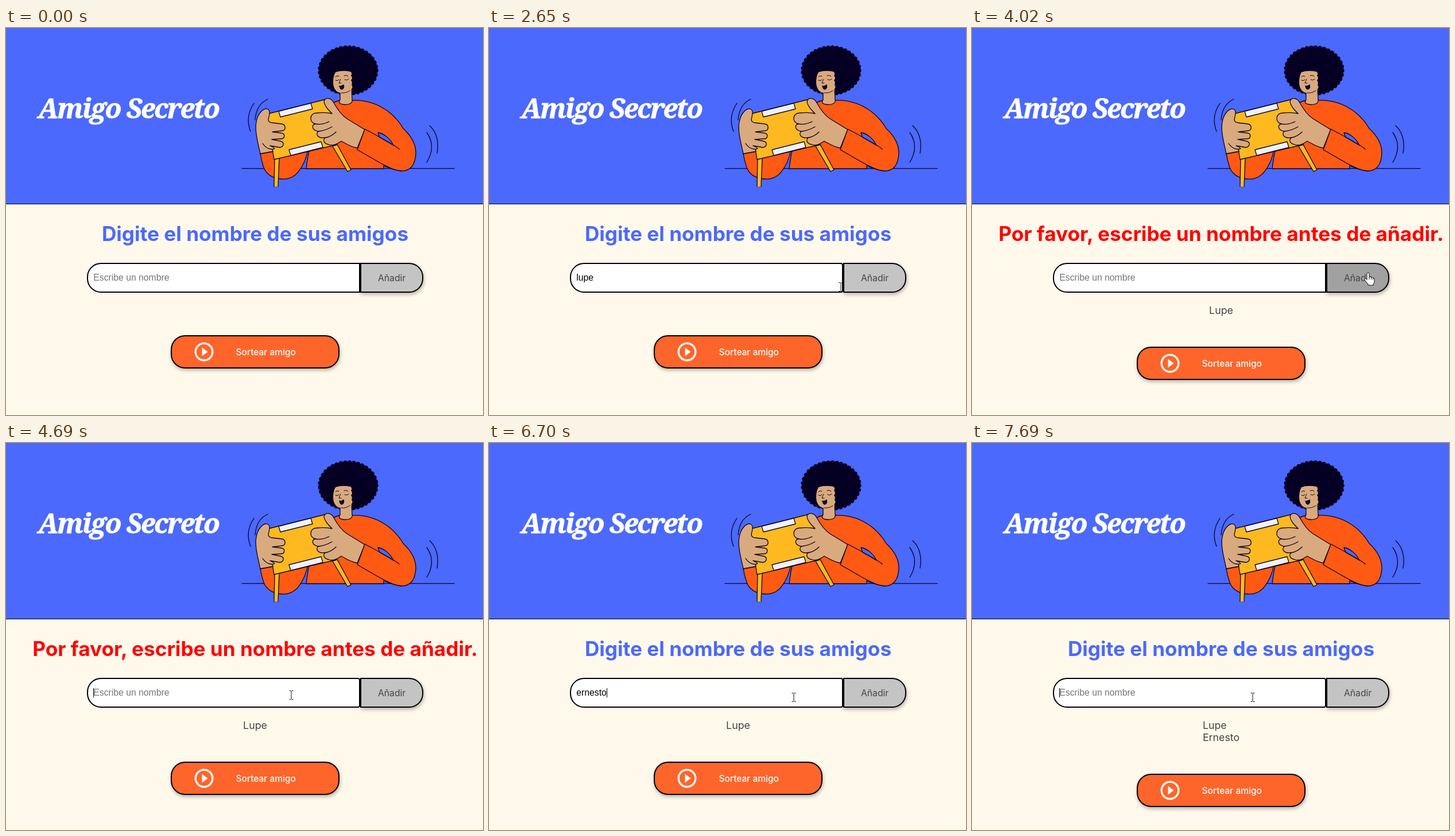
Write an HTML page that moves like this. It is 831x674 px and loops after 8 s.

```html
<!DOCTYPE html>
<html lang="es">
<head>
<meta charset="utf-8">
<title>Amigo Secreto</title>
<style>
  html, body { margin: 0; width: 100%; height: 100%; overflow: hidden; background: #fff9eb; }
  svg { display: block; width: 831px; height: 674px; }
  text { font-family: Inter, sans-serif; font-size: 15.7px; white-space: pre; }
  .title { font: italic 700 47px "Noto Serif", serif; letter-spacing: -2.1px; fill: #fff; stroke: #fff; stroke-width: .8; }
  .heading { font-size: 35.16px; font-weight: 700; text-anchor: middle; }
  .field { font: 15.75px "Liberation Sans", Arial, sans-serif; }
  .list text { font-size: 17.8px; fill: #444; }
  .box { stroke: #000; stroke-width: 2; }
  .raised { filter: drop-shadow(1px 3px 3px rgba(0, 0, 0, .3)); }
  .art { stroke: #0b0420; stroke-width: 1.3; stroke-linejoin: round; stroke-linecap: round; fill: none; }
  .skin { fill: #d9aa7e; }
  .orange { fill: #ff5a13; }
  .yellow { fill: #fdb91f; }
  .white { fill: #f1f1fb; }
</style>
</head>
<body>
<svg viewBox="0 0 831 674">
  <rect width="831" height="306" fill="#4b69fd"/>
  <rect y="306" width="831" height="1" fill="#000"/>
  <text class="title" x="56" y="156.500">Amigo Secreto</text>

  <g class="art">
    <path d="M411 244.600H781"/>
    <!-- hair -->
    <ellipse cx="596" cy="74" rx="49" ry="40" fill="#050023" stroke="none"/>
    <ellipse cx="596" cy="74" rx="48.500" ry="39.500" stroke="#050023" stroke-width="8.500" stroke-dasharray="0 7.500"/>
    <!-- torso and far arm -->
    <path class="orange" d="M523 245C525 225 533 175 560 137C570 129 577 127 582 126H603C628 125 650 133 668 147C680 157 688 168 692 175C706 188 714 201 714 218C713 239 704 249 689 249C682 249 675 247 658 240L658 245Z"/>
    <path fill="#4b69fd" d="M648 182C659 184 671 194 675 205L651 191Z"/>
    <!-- face and neck -->
    <path class="skin" d="M582 110L582 125C578 130 582 133 591 133.500C600 133 604 130 603 125L602 105Z"/>
    <path class="skin" stroke="none" d="M574 77Q585 73 600 76Q604 79 601 83Q605 87 601 91Q604 95 602 99Q605 103 602 106L601 110C596 113 588 114 583 113C575 112 570 105 570 94Q570 84 574 77Z"/>
    <path stroke-width="1" d="M574 85q3-3 6-1M589 83q4-2 7 1M574 91q3 2 6-1M590 90q4 2 7-1M583 89Q581 93 580 96h4M584 113Q592 114 599 109"/>
    <path d="M581 101Q585 102 588 99Q590 105 585 107Q582 106 581 101Z" fill="#0b0420"/>
    <!-- near sleeve -->
    <path class="orange" d="M443 219L465 215L526 211C524 225 518 240 508 252C499 262 490 264 480 263C464 262 454 255 449 243Q445 231 443 219Z"/>
    <!-- parcel -->
    <path class="yellow" stroke="none" d="M468 227H476L474 276H467Z"/>
    <path d="M468 227L467 276M476 227L474 276"/>
    <path class="yellow" d="M569 206L577 203L601 247L595 250Z"/>
    <path class="yellow" d="M454 150L562 123L577 203L467 229Z"/>
    <path class="white" d="M475 145L531 131L534 141L478 155ZM493 212L549 198L552 208L496 222Z"/>
    <!-- hands -->
    <path class="skin" d="M443 219C439 200 433 180 436 164C438 150 448 139 455 141C461 143 459 150 458 155C456 160 457 164 463 165L480 167C488 168 488 178 481 179L464 181L480 183C487 184 486 193 479 193L463 194L478 197C486 199 484 207 477 208L460 205C467 208 471 211 464 211L465 215Z"/>
    <path d="M447 201C451 207 456 211 463 211"/>
    <path class="skin" d="M554 128C556 120 566 121 571 130C578 143 585 152 594 158L625 177L612 209C600 207 590 200 584 197C576 202 570 206 562 203C553 201 552 195 556 191C545 193 538 186 544 180C532 178 532 168 539 167C527 164 529 148 541 148C550 147 560 147 568 149C562 143 555 136 554 128Z"/>
    <path d="M539 167C549 169 556 166 563 163M544 180C555 179 561 176 568 172M556 191C564 190 570 186 575 181"/>
    <!-- near forearm -->
    <path class="orange" stroke="none" d="M625 176L685 211L705 225L689 249C675 248 664 241 652 235L612 212Z"/>
    <path d="M685 211Q680 205 625 176L612 212L652 235C664 241 675 248 689 249"/>
    <!-- shake marks -->
    <path d="M432 131Q416 154 426 180M456 124Q436 133 434 160M738 170Q756 187 751 218M733 182Q750 206 733 234"/>
  </g>

  <text id="heading" class="heading" x="434" y="371"></text>

  <path id="add" class="box raised" d="M618 410H702.500A23.500 23.500 0 0 1 726 433.500V436.500A23.500 23.500 0 0 1 702.500 460H618Z"/>
  <text x="648" y="441" fill="#444">Añadir</text>
  <path id="input" class="box" fill="#fff"/>
  <text id="value" class="field" x="152.300" y="440.300"></text>
  <rect id="caret" y="427" width="1" height="16"/>

  <g class="list">
    <text y="498">Lupe</text>
    <text y="518.500">Ernesto</text>
  </g>

  <g id="draw">
    <rect class="box raised" x="288" y="536" width="292" height="56" rx="24" fill="#fe652b"/>
    <circle cx="345" cy="564" r="14.800" fill="none" stroke="#fff" stroke-width="3.300"/>
    <path d="M341.500 556.500L351.500 564L341.500 571.500Z" fill="#fff"/>
    <text x="400.500" y="570.300" fill="#fff" font-weight="500" style="font-size: 15.5px">Sortear amigo</text>
  </g>

  <path id="beam" fill="none" stroke="#111" d="M-3.500-7.500H-1L0-6.500L1-7.500H3.500M0-6.500V6.500M-3.500 7.500H-1L0 6.500L1 7.500H3.500"/>
  <path id="hand" fill="#fff" stroke="#111" stroke-linejoin="round" d="M-2 2Q-2 0 0 0Q2 0 2 2V8Q4 6 5.500 8.500Q7.500 7 8.500 9.500Q11 8.500 11 11.500V15Q11 18 9 20V22H0V20L-6 13Q-7 10 -4 10.500L-2 12.500ZM2 8V12M5.500 8.500V12M8.500 9.500V12.500"/>
</svg>
<script>
const $ = id => document.getElementById(id);
const LOOP = 8000;
const names = [...document.querySelectorAll('.list text')];

// Each step changes only the listed parts of the state.
const steps = [
  { t: 0, text: '', caret: 0, focus: 0, hover: 0, error: 0, count: 0, at: null },
  { t: 310, at: [341.5, 438] },
  { t: 660, focus: 1, caret: 1, at: [332, 433] },
  { t: 980, at: [344, 440] },
  { t: 1320, text: 'l' },
  { t: 1650, text: 'lup' },
  { t: 1980, text: 'lupe' },
  { t: 2320, caret: 0 },
  { t: 2650, at: [613, 451] },
  { t: 2980, focus: 0, hover: 1, at: [650, 432] },
  { t: 3350, text: '', count: 1, hover: 0, at: [493, 443] },
  { t: 3680, hover: 1, at: [689, 432] },
  { t: 4020, error: 1, at: [690, 426] },
  { t: 4350, hover: 0, at: [497, 439] },
  { t: 4690, focus: 1, caret: 1 },
  { t: 5030, caret: 0, at: [500, 435] },
  { t: 5350, text: 'er', caret: 1 },
  { t: 5700, text: 'erne' },
  { t: 6020, text: 'ernes', error: 0 },
  { t: 6360, text: 'ernest' },
  { t: 6700, text: 'ernesto', at: [531, 443] },
  { t: 7020, text: '', caret: 0, focus: 0, hover: 1, count: 2, at: [690, 430] },
  { t: 7360, hover: 0, at: [490, 454] },
  { t: 7690, focus: 1, caret: 1, at: [489, 443] }
];

const show = (el, on) => el.setAttribute('visibility', on ? 'visible' : 'hidden');
const place = (el, [x, y]) => el.setAttribute('transform', `translate(${x} ${y})`);

function fieldPath(r) {
  return `M${616 - r} 410H165.5A23.5 23.5 0 0 0 142 433.5V436.5A23.5 23.5 0 0 0 165.5 460` +
    `H${616 - r}Q616 460 616 ${460 - r}V${410 + r}Q616 410 ${616 - r} 410Z`;
}

function render(s) {
  const heading = $('heading'), value = $('value');
  heading.textContent = s.error
    ? 'Por favor, escribe un nombre antes de añadir.'
    : 'Digite el nombre de sus amigos';
  heading.setAttribute('fill', s.error ? '#f00' : '#4b69fd');

  $('input').setAttribute('d', fieldPath(s.focus ? 3 : 0));
  $('add').setAttribute('fill', s.hover ? '#a1a1a1' : '#c4c4c4');
  value.textContent = s.text || 'Escribe un nombre';
  value.setAttribute('fill', s.text ? '#000' : '#757575');
  const width = s.text ? value.getComputedTextLength() : 0;
  $('caret').setAttribute('x', Math.round(152.3 + width));
  show($('caret'), s.caret);

  const widest = Math.max(0, ...names.slice(0, s.count).map(n => n.getComputedTextLength()));
  names.forEach((n, i) => {
    n.setAttribute('x', 434 - widest / 2);
    show(n, i < s.count);
  });
  place($('draw'), [0, Math.floor(20.5 * s.count)]);

  show($('beam'), s.at && !s.hover);
  show($('hand'), s.at && s.hover);
  if (s.at) place(s.hover ? $('hand') : $('beam'), s.at);
}

let last = -1;
function tick() {
  const now = performance.now() % LOOP;
  const done = steps.filter(s => s.t <= now);
  if (done.length !== last) {
    last = done.length;
    render(Object.assign({}, ...done));
  }
  requestAnimationFrame(tick);
}
tick();
</script>
</body>
</html>
```
